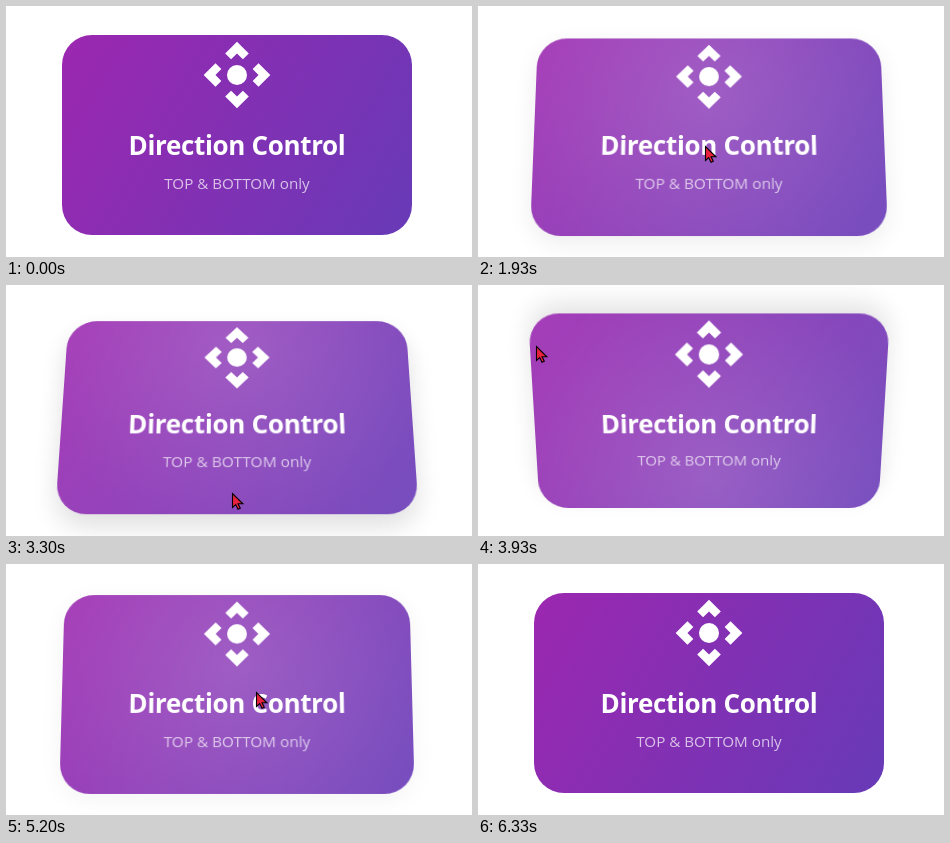
Recreate the animation shown at these times as an HTML page. Size 466 by 251 pixels, loop 7060 ms.

```html
<!DOCTYPE html>
<html lang="en">
<head>
<meta charset="utf-8">
<title>Direction Control</title>
<style>
html, body { margin: 0; width: 100%; height: 100%; overflow: hidden; background: #fff; }
#stage { position: relative; width: 466px; height: 251px; overflow: hidden; background: #fff; }
svg { position: absolute; overflow: visible; }
#card { left: 56px; top: 29px; transform-origin: 50% 50%; }
#cursor { left: 0; top: 0; }
text { font-family: "Open Sans", "Noto Sans", sans-serif; text-anchor: middle; fill: #fff; }
.title { font-size: 26px; font-weight: 700; letter-spacing: -.34px; }
.sub { font-size: 15.2px; fill-opacity: .7; }
</style>
</head>
<body>
<div id="stage">
  <svg id="card" width="350" height="200" viewBox="0 0 350 200">
    <defs>
      <linearGradient id="base" gradientUnits="userSpaceOnUse" x1="0" y1="0" x2="350" y2="200">
        <stop offset="0" stop-color="#9c27b0"/>
        <stop offset="1" stop-color="#673ab7"/>
      </linearGradient>
      <radialGradient id="glow" gradientUnits="userSpaceOnUse" cx="175" cy="100" r="200">
        <stop offset="0" stop-color="#fff" stop-opacity=".22"/>
        <stop offset="1" stop-color="#fff" stop-opacity=".1"/>
      </radialGradient>
      <filter id="blur" x="-30%" y="-40%" width="160%" height="180%">
        <feGaussianBlur stdDeviation="12"/>
      </filter>
    </defs>
    <rect id="shadow" width="350" height="200" rx="30" filter="url(#blur)"/>
    <rect width="350" height="200" rx="30" fill="url(#base)"/>
    <g transform="translate(135 0) scale(3.3333)" fill="#fff">
      <circle cx="12" cy="12" r="3"/>
      <path id="arrow" d="M15.54 5.54 13.77 7.3 12 5.54 10.23 7.3 8.46 5.54 12 2z"/>
      <use href="#arrow" transform="rotate(90 12 12)"/>
      <use href="#arrow" transform="rotate(180 12 12)"/>
      <use href="#arrow" transform="rotate(270 12 12)"/>
    </g>
    <text class="title" x="175" y="120">Direction Control</text>
    <text class="sub" x="175" y="154">TOP &amp; BOTTOM only</text>
    <rect id="light" width="350" height="200" rx="30" fill="url(#glow)"/>
  </svg>
  <svg id="cursor" width="466" height="251">
    <path id="pointer" d="M.5 .5V14.5L3.7 11.6 6 16.3 8.3 15.3 6.1 10.8H10.9Z"
      fill="#e8213f" stroke="#000" stroke-width="1.1"/>
  </svg>
</div>
<script>
const LOOP = 7060, LAG = 160, SAMPLES = 16, MAX_ANGLE = 18;

// Turning points of the pointer tip: time, x, y
const path = [
  [1030, 438, 254], [1430, 290, 229], [1740, 238, 200],
  [2240, 217, 46], [2430, 216, 45], [2700, 216, 45],
  [3300, 226, 208], [3900, 58, 62], [4500, 82, 50],
  [4880, 150, 208], [5520, 340, 48], [5770, 370, 177], [6060, 478, 262]
];
const last = path.length - 1;
const $ = id => document.getElementById(id);
const clamp = (v, a, b) => Math.max(a, Math.min(b, v));

function slope(i, k) {
  return (path[i + 1][k] - path[i][k]) / (path[i + 1][0] - path[i][0]);
}

// Monotone tangent, so the pointer never overshoots a key point
function tangent(i, k) {
  if (i === 0) return slope(0, k);
  if (i === last) return slope(last - 1, k);
  const a = slope(i - 1, k), b = slope(i, k);
  return a * b <= 0 ? 0 : 2 * a * b / (a + b);
}

function pointerAt(t) {
  if (t <= path[0][0] || t >= path[last][0]) return null;
  let i = 0;
  while (t >= path[i + 1][0]) i++;
  const h = path[i + 1][0] - path[i][0], u = (t - path[i][0]) / h;
  const at = k => {
    const p = path[i][k], q = path[i + 1][k], w = u * u * (3 - 2 * u);
    return p + (q - p) * w
      + h * tangent(i, k) * u * (1 - u) * (1 - u)
      - h * tangent(i + 1, k) * u * u * (1 - u);
  };
  return [at(1), at(2)];
}

// Smoothed tilt (-1 top, 1 bottom) and hover amount
function stateAt(t) {
  let tilt = 0, hover = 0;
  for (let i = 0; i < SAMPLES; i++) {
    const p = pointerAt(t - LAG * i / (SAMPLES - 1));
    if (!p || p[0] < 54 || p[0] > 408 || p[1] < 29 || p[1] >= 229) continue;
    tilt += clamp((p[1] - 129) / 80, -1, 1) / SAMPLES;
    hover += 1 / SAMPLES;
  }
  return { tilt, hover };
}

function draw(t) {
  const { tilt, hover } = stateAt(t), p = pointerAt(t);
  // The edge under the pointer comes towards the viewer
  $("card").style.transform = Math.abs(tilt) < 1e-4 ? "none"
    : `perspective(700px) rotateX(${tilt * MAX_ANGLE}deg)`;
  $("shadow").setAttribute("y", tilt * 14);
  $("shadow").setAttribute("opacity", Math.abs(tilt) * .14);
  $("glow").setAttribute("cy", 100 - tilt * 85);
  $("light").setAttribute("opacity", hover);
  $("pointer").setAttribute("visibility", p ? "visible" : "hidden");
  if (p) $("pointer").setAttribute("transform", `translate(${Math.round(p[0])} ${Math.round(p[1])})`);
}

const start = performance.now();
function frame() {
  draw((performance.now() - start) % LOOP);
  requestAnimationFrame(frame);
}
frame();
</script>
</body>
</html>
```
